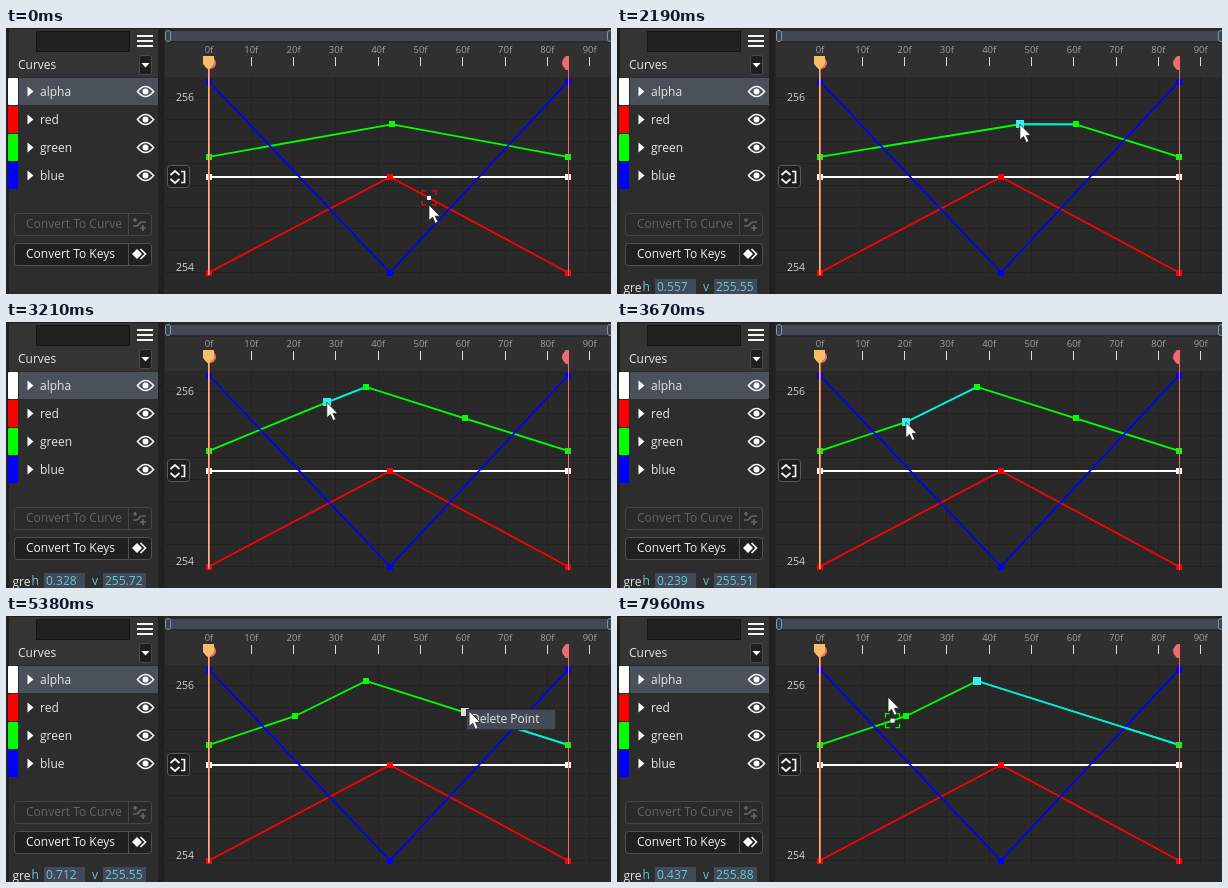
An HTML page for the animation above (8000 ms loop, 605 by 266 pixels).

```html
<!DOCTYPE html>
<html>
<head>
<meta charset="utf-8">
<style>
html, body { margin: 0; width: 100%; height: 100%; overflow: hidden; background: #262626; }
svg { display: block; font: 12px "Open Sans", "Noto Sans", sans-serif; fill: #e6e6e6; }
.line { fill: none; stroke-width: 1.8; }
.icon { fill: none; stroke: #f4f4f4; stroke-width: 1.7; }
</style>
</head>
<body>
<svg width="605" height="266" viewBox="0 0 605 266">
  <!-- side panel -->
  <rect width="158" height="266" fill="#202020"/>
  <rect x="3" y="1" width="149" height="265" fill="#2d2d2d"/>
  <rect x="3" y="1" width="149" height="48" fill="#343434"/>
  <rect x="30.5" y="3.5" width="93" height="20" fill="#212121" stroke="#151515"/>
  <path d="M131 8h16M131 13h16M131 18h16" stroke="#f4f4f4" stroke-width="2"/>
  <text x="12" y="41">Curves</text>
  <rect x="133.5" y="27.5" width="12" height="19" rx="2" fill="#1e1e1e" stroke="#4a4a4a"/>
  <path d="M135.5 35h8l-4 4.5z" fill="#fff"/>
  <g id="rows"></g>

  <rect x="8.5" y="185.5" width="137" height="22" rx="3" fill="#2a2a2a" stroke="#464646"/>
  <path d="M122.5 186v21" stroke="#464646"/>
  <text x="20" y="200" fill="#646464">Convert To Curve</text>
  <path d="M127 198h3q2 0 3-2t3-2h4M134 200h6M137 197v6M127 192h4M129 190v4" class="icon" style="stroke:#666"/>
  <rect x="8.5" y="215.5" width="137" height="22" rx="3" fill="#202020" stroke="#505050"/>
  <path d="M122.5 216v21" stroke="#505050"/>
  <text x="20" y="230" fill="#f0f0f0">Convert To Keys</text>
  <path d="M131 221l5 5-5 5-5-5z" fill="#fff"/>
  <path d="M134.5 221l5 5-5 5" class="icon"/>

  <g id="fields">
    <text x="6.5" y="264">gre</text>
    <rect x="25" y="250" width="127" height="16" fill="#2d2d2d"/>
    <rect x="38" y="251" width="41" height="15" fill="#414b57"/>
    <rect x="97" y="251" width="43" height="15" fill="#414b57"/>
    <g fill="#6cc6dc">
      <text x="25.5" y="263">h</text><text x="86" y="263">v</text>
      <text x="40" y="263" id="h"></text><text x="99" y="263" id="v"></text>
    </g>
  </g>

  <!-- chart -->
  <rect x="159" width="446" height="266" fill="#292929"/>
  <rect x="159" y="15" width="446" height="34" fill="#303030"/>
  <rect x="162" y="3" width="443" height="10" fill="#424955"/>
  <g fill="#39434f" stroke="#8496ac">
    <rect x="159.5" y="2.5" width="5" height="11" rx="2.5"/><rect x="601.5" y="2.5" width="5" height="11" rx="2.5"/>
  </g>
  <path id="grid" stroke="#222" fill="none"/>
  <g id="ruler" font-size="9.5" fill="#a0a0a0" text-anchor="middle"></g>
  <g font-size="10.5" fill="#d0d0d0"><text x="170" y="73">256</text><text x="170" y="243">254</text></g>
  <rect x="161.5" y="137.5" width="22" height="22" rx="3" fill="#1e1e1e" stroke="#5a5a5a"/>
  <path d="M164.5 147l4.5-4 4.5 4M164.5 151l4.5 4 4.5-4M175 143.5h3.5v11h-3.5" class="icon"/>

  <g id="curves"></g>
  <path d="M562.5 29v219M203.5 40v207" stroke="#f06c6c"/>
  <path d="M560 28h3v14h-3q-4-4-4-7t4-7z" fill="#f06c6c"/>
  <circle cx="204" cy="35" r="6" fill="#f06c6c"/>
  <path d="M202.5 40v207" stroke="#f7bd68"/>
  <path d="M197 28h11v8l-5.5 6-5.5-6z" fill="#f7bd68"/>
  <g id="hover">
    <path d="M-7-3v-4h4M3-7h4v4M7 3v4h-4M-3 7h-4v-4" fill="none" stroke-width="1.3"/>
    <rect x="-2" y="-2" width="4" height="4" fill="#fff" stroke="none"/>
  </g>
  <g id="menu">
    <rect x="460.5" y="93.5" width="89" height="20" fill="#434a56" stroke="#2a2d33"/>
    <text x="465" y="107">Delete Point</text>
  </g>
  <path id="cursor" d="M0 0V15.5L3.6 12.3 6.3 18.3 9 17 6.3 11.3H11z" fill="#fff" stroke="#222" stroke-width=".8"/>
</svg>
<script>
const $ = id => document.getElementById(id);
const LOOP = 8000, LEFT = 203, RIGHT = 562, PEAK = 384, MID = 149, UNIT = 95.5;
const MENU = 5380, DELETED = 5970;

const colors = { alpha: '#fff', red: '#f00', green: '#0f0', blue: '#00f' };
$('rows').innerHTML = Object.entries(colors).map(([name, color], i) => `
  <g transform="translate(0 ${50 + 28 * i})">
    <rect x="13" width="139" height="27" fill="${i ? '#2d2d2d' : '#4a515b'}"/>
    <rect x="2" width="10" height="27" rx="1" fill="${color}"/>
    <path d="M21.5 8.5v10l6-5z" fill="#fff"/>
    <text x="34" y="18">${name}</text>
    <path d="M131.5 13.5q8-10 16 0q-8 10-16 0z" class="icon"/>
    <circle cx="139.5" cy="13.5" r="3" fill="#fff"/>
  </g>`).join('');

let grid = '';
for (let i = 0; i < 10; i++) {
  const x = LEFT + 42.3 * i, tick = Math.floor(x) + .5;
  grid += `M${tick} 49V248`;
  if (i < 9) grid += `M159 ${Math.round(69 + 21.9 * i) + .5}H605`;
  $('ruler').innerHTML += `<text x="${x}" y="25">${i * 10}f</text>
    <path d="M${tick} 29v9" stroke="#ddd"/>`;
}
$('grid').setAttribute('d', grid);

// Pointer moves: start, end, target x and y, and the point dragged along.
const moves = [
  [0, 750, 388, 92],
  [800, 1544, 460.7, 92, 'P'],
  [1700, 2050, 400, 104],
  [2060, 2190, 403, 96.3, 'Q'],
  [2190, 2720, 360, 65, 'Q'],
  [2800, 3130, 320.8, 80.3],
  [3220, 3660, 288.9, 100.2, 'R'],
  [3780, 4180, 368, 66],
  [4180, 4310, 406, 98],
  [4310, 4800, 463, 95],
  [MENU, 5740, 493, 104],
  [6320, 7180, 361, 69],
  [7740, 7960, 271, 81]
];
// Where each point is first placed.
const start = { A: [LEFT, 128.8], R: [320.8, 80.3], Q: [400, 104], P: [386, 96.3], B: [RIGHT, 128.8] };
const picks = [[800, 'P'], [2060, 'Q'], [3150, 'R'], [4850, 'P'], [DELETED, 'B'], [7400, 'Q']];

const last = (list, t) => list.filter(item => item[0] <= t).pop();
const mix = (a, b, f) => a.map((v, i) => v + (b[i] - v) * f);

function pointer(t) {
  let pos = [423, 177];
  for (const [from, to, x, y] of moves)
    if (t > from) pos = mix(pos, [x, y], Math.min(1, (t - from) / (to - from)));
  return pos;
}

function pointAt(name, t) {
  let [x, y] = start[name];
  for (const [from, to, , , grabbed] of moves) {
    if (grabbed != name || t < from) continue;
    const a = pointer(from), b = pointer(Math.min(t, to));
    x += b[0] - a[0];
    y += b[1] - a[1];
  }
  return [x, y];
}

function heightAt(points, x) {
  const i = Math.max(1, points.findIndex(p => p[0] >= x)), a = points[i - 1], b = points[i];
  return mix(a, b, (x - a[0]) / (b[0] - a[0]))[1];
}

const line = (points, color) => `<polyline class="line" points="${points.join(' ')}" stroke="${color}"/>`;
const dot = ([x, y], color, size = 6) =>
  `<rect x="${Math.round(x - size / 2)}" y="${Math.round(y - size / 2)}" width="${size}" height="${size}" fill="${color}"/>`;
const place = (id, [x, y]) => $(id).setAttribute('transform', `translate(${x} ${y})`);
const show = (id, on) => $(id).style.display = on ? '' : 'none';

function draw(t) {
  const selected = last(picks, t)?.[1];
  const names = ['A', t >= 3150 && 'R', t >= 2060 && 'Q', t < DELETED && 'P', 'B'].filter(Boolean);
  const green = names.map(n => pointAt(n, t));
  const curves = {
    alpha: [[LEFT, MID], [RIGHT, MID]],
    green,
    red: [[LEFT, MID + UNIT], [PEAK, MID], [RIGHT, MID + UNIT]],
    blue: [[LEFT, MID - UNIT], [PEAK, MID + UNIT], [RIGHT, MID - UNIT]]
  };

  let out = '';
  for (const name in curves)
    out += line(curves[name], colors[name]) + curves[name].map(p => dot(p, colors[name])).join('');
  if (selected) {
    const i = names.indexOf(selected), [x, y] = green[i];
    if (selected != 'B')
      out += line(green.slice(i, i + 2), '#00e8f0') + dot(green[i + 1], colors.green)
        + dot(green[i], selected == 'P' ? '#ddd' : '#30f0f0', 8);
    $('h').textContent = ((x - LEFT) / (RIGHT - LEFT)).toFixed(3);
    $('v').textContent = (255 + (MID - y) / UNIT).toFixed(2);
  }
  $('curves').innerHTML = out;
  const menu = t >= MENU && t < DELETED;
  show('fields', selected);
  show('menu', menu);
  place('cursor', pointer(t));

  // The hover frame trails the pointer slightly and snaps to the nearest curve.
  const [x, y] = pointer(t - 12);
  const [name, level] = Object.keys(curves)
    .map(n => [n, heightAt(curves[n], x)])
    .sort((a, b) => Math.abs(a[1] - y) - Math.abs(b[1] - y))[0];
  const onPoint = curves[name].some(p => Math.hypot(p[0] - x, p[1] - level) < 8);
  const dragging = last(moves, t)[4];
  show('hover', !menu && !dragging && !onPoint && Math.abs(level - y) < 28);
  place('hover', [x, level]);
  $('hover').setAttribute('stroke', colors[name]);
}

(function frame() {
  draw(performance.now() % LOOP);
  requestAnimationFrame(frame);
})();
</script>
</body>
</html>
```
